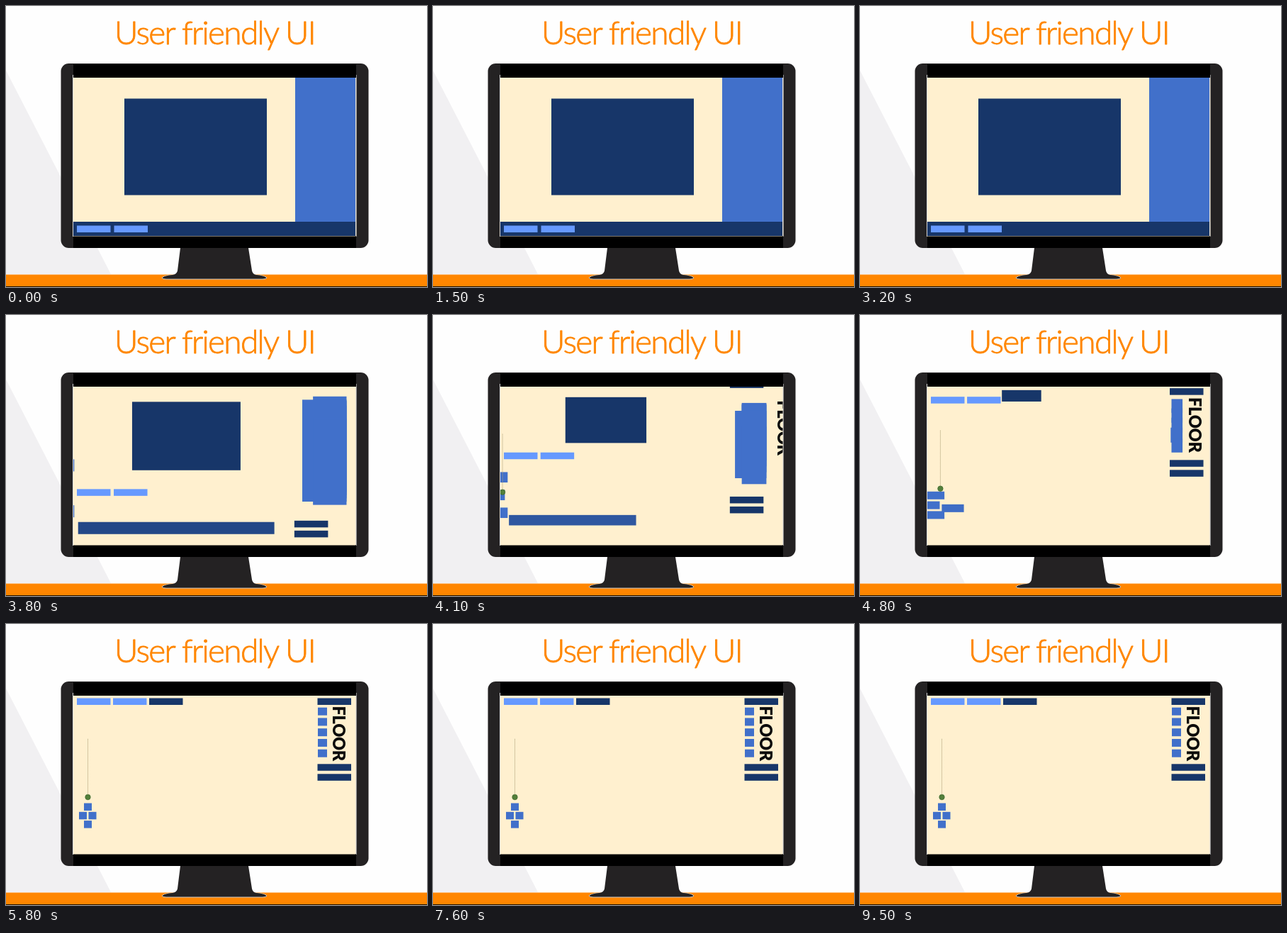
These frames come from a looping animation (594x396 px, 9.6 s). An HTML page:

```html
<!DOCTYPE html>
<html lang="en">
<head>
<meta charset="utf-8">
<title>User friendly UI</title>
<style>
  html, body { margin: 0; width: 100%; height: 100%; overflow: hidden; background: #fefefe; }
  svg { display: block; width: 594px; height: 396px; }
  text { font-family: Lato, "Open Sans", sans-serif; }
  .title { font-size: 46px; font-weight: 300; letter-spacing: -1.7px; text-anchor: middle;
    fill: #ff8600; stroke: #ff8600; stroke-width: .8px; stroke-linejoin: round; }
  .floor { font-size: 23.5px; font-weight: 900; letter-spacing: -.3px; fill: #0b0b0b; }
</style>
</head>
<body>
<svg viewBox="0 0 594 396">
  <defs><clipPath id="view"><rect x="95" y="101" width="398.5" height="223.5"/></clipPath></defs>

  <rect width="594" height="396" fill="#fefefe"/>
  <path d="M0 91L148 378H0Z" fill="#f1f0f2"/>
  <rect y="378.5" width="594" height="17" fill="#ff8600"/>
  <rect y="395" width="594" height="1" fill="#1c1206"/>
  <text class="title" x="294.5" y="54.3">User friendly UI</text>

  <path d="M220 383Q222 380 235 379H353Q366 380 368 383Q367 385 362 385H226Q221 385 220 383Z" fill="#242223" stroke="#cfcac4"/>
  <path d="M246 341H342L347 373Q348 378 353 379Q364 380 366 382.5H222Q224 380 235 379Q241 378 242 373Z" fill="#242223"/>
  <rect x="77.5" y="81" width="434" height="260" rx="11" fill="#242223"/>
  <rect x="94" y="97" width="400.6" height="228" fill="#d6d6d6"/>
  <rect x="95" y="82" width="399" height="19" fill="#000"/>
  <rect x="95" y="324" width="399" height="17" fill="#000"/>

  <g clip-path="url(#view)">
    <rect x="95" y="100" width="399" height="225" fill="#fff0cf"/>
    <g id="boxes"></g>
    <g id="pin">
      <path d="M115.5 162V241" stroke="#a79d74" stroke-dasharray="1 1"/>
      <circle cx="115.5" cy="244" r="3.7" fill="#53803b" stroke="#41692f" stroke-width=".8"/>
    </g>
    <g id="label"><text class="floor" transform="translate(461 115.5) rotate(90)">FLOOR</text></g>
  </g>
</svg>
<script>
const LOOP = 9600, STEP = 100, MORPH_START = 3300, MORPH_TIME = 2100;
const DARK = [23, 54, 105], BLUE = [65, 112, 202], LIGHT = [102, 153, 255];
const $ = id => document.getElementById(id);
const mix = (a, b, p) => a + (b - a) * p;
const parts = [];

const rect = (x, y, width, height) => ({ x, y, width, height });
const strip = (x, y) => rect(x, y, 47.5, 9.5);
const tile = (x, y) => rect(x, y, 11, 10.5);

function box(from, to, color, endColor = color) {
  const el = document.createElementNS("http://www.w3.org/2000/svg", "rect");
  $("boxes").append(el);
  parts.push(p => {
    for (const k in from) el.setAttribute(k, mix(from[k], to[k], p));
    el.setAttribute("fill", `rgb(${color.map((v, i) => Math.round(mix(v, endColor[i], p)))})`);
  });
}

function slide(el, dx, dy) {
  parts.push(p => el.setAttribute("transform", `translate(${dx * (1 - p)} ${dy * (1 - p)})`));
}

// Side panel: one full piece and four inset ones shrink to a column
for (let i = 0; i < 5; i++) {
  const inset = i === 3 ? 0 : 22;
  const top = inset && 16 * Math.abs(i - 2);
  box(rect(408 + inset, 100 + top, 85 - inset, 204 - top),
    rect(440, 117.7 + 14.75 * i, 13, 11), BLUE);
}

// Bottom bar and three bands from the left meet in a diamond
box(rect(95, 304, 398, 20), tile(116.5, 264.8), DARK, BLUE);
for (let i = 0; i < 3; i++)
  box(rect(-200, 181 + 41.5 * i, 285, 20), tile(110 - 7 * (i % 2), 252.5 + 12.3 * i), BLUE);

// Top row of buttons
box(rect(167, 130.5, 201, 136), strip(202, 104.5), DARK);
for (let i = 0; i < 2; i++)
  box(strip(100 + 52.5 * i, 309.5), strip(100 + 51 * i, 104.5), LIGHT);

// Strips on the right enter from above and below
box(strip(392, 79), strip(439.5, 104.5), DARK);
for (let i = 0; i < 2; i++)
  box(strip(392, 332 + 14 * i), strip(439.5, 197.3 + 14 * i), DARK);

slide($("pin"), -40, 13);
slide($("label"), 57, 11);

function ease(t) {
  const u = Math.min(1, Math.max(0, (t - MORPH_START) / MORPH_TIME));
  return 1 - (1 - u ** 1.55) ** 3.28;
}

function draw(t) {
  const p = ease(Math.floor(t / STEP) * STEP);
  for (const part of parts) part(p);
}

const start = performance.now();
function tick() {
  draw((performance.now() - start) % LOOP);
  requestAnimationFrame(tick);
}
tick();
</script>
</body>
</html>
```
